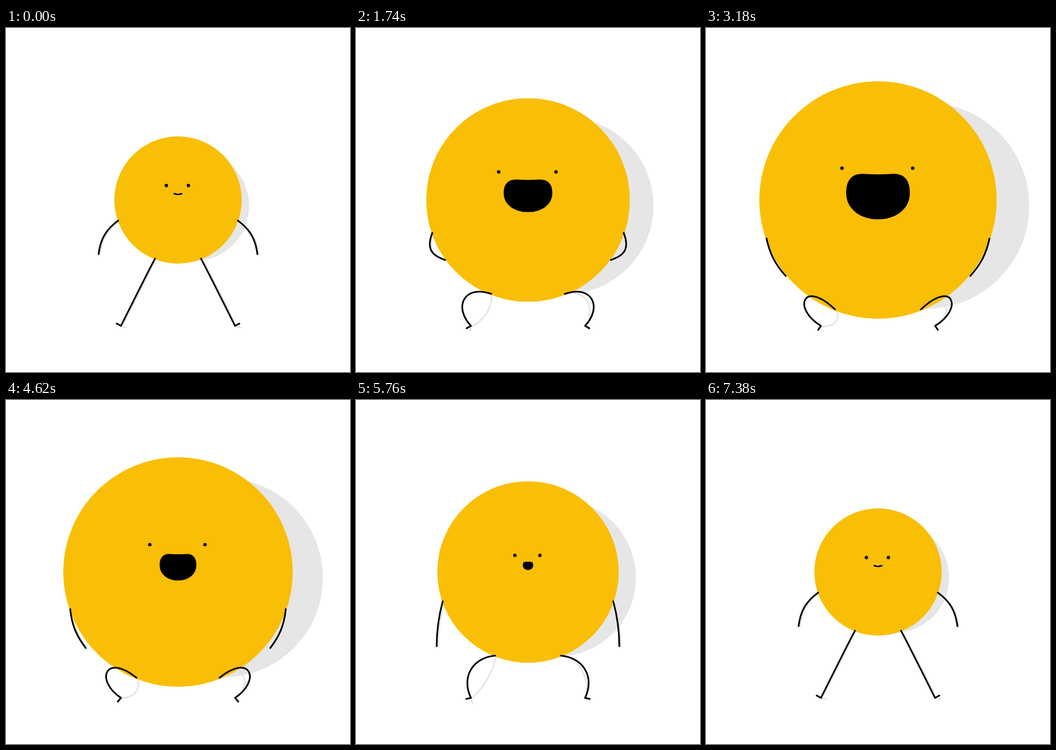
Recreate the animation shown at these times as an HTML page. Size 600x600 px, loop 7.89 s.

```html
<!DOCTYPE html>
<html lang="en">
<head>
<meta charset="utf-8">
<title>Breathe</title>
<style>
  html, body { margin: 0; width: 100%; height: 100%; overflow: hidden; background: #fff; }
  svg { display: block; width: 100vw; height: 100vh; }
  .line { fill: none; stroke: #000; stroke-width: 2.9; stroke-linecap: round; stroke-linejoin: round; }
  .soft { stroke: #e6e6e6; }
  #mouth { stroke: #000; stroke-width: 2.4; stroke-linejoin: round; }
</style>
</head>
<body>
<svg viewBox="0 0 600 600">
  <path id="limbShade" class="line soft"/>
  <circle id="shade" cy="310" fill="#e6e6e6"/>
  <circle id="ball" cx="300" cy="300" fill="#f9be06"/>
  <path id="limbs" class="line"/>
  <circle id="eyeL" r="3"/>
  <circle id="eyeR" r="3"/>
  <path id="mouth"/>
</svg>
<script>
const LOOP = 7890, PEAK = 3690, END = 7380;
const el = id => document.getElementById(id);
const set = (id, attrs) => { for (const k in attrs) el(id).setAttribute(k, attrs[k]); };
const clamp = x => Math.min(1, Math.max(0, x));
const span = (t, a, b) => clamp((t - a) / (b - a));
const smooth = x => x * x * (3 - 2 * x);
const mix = (a, b, k) => a + (b - a) * k;
const pt = p => p[0].toFixed(2) + ' ' + p[1].toFixed(2);
const cubic = (a, b, c, d) => `M${pt(a)}C${pt(b)} ${pt(c)} ${pt(d)}`;
const flip = p => [600 - p[0], p[1]];
const shift = (p, dx, dy) => [p[0] + dx, p[1] + dy];

// Ease with control points (a, 0) and (b, 1)
function ease(x, a, b) {
  let lo = 0, hi = 1;
  for (let i = 0; i < 24; i++) {
    const s = (lo + hi) / 2, r = 1 - s;
    if (3 * a * s * r * r + 3 * b * s * s * r + s * s * s < x) lo = s; else hi = s;
  }
  return smooth(lo);
}

// Point at an angle in degrees, 8.5 away: the tip of a foot
function toe(p, deg) {
  const a = deg * Math.PI / 180;
  return shift(p, 8.5 * Math.cos(a), 8.5 * Math.sin(a));
}

// Elastic arm: the closer the hand, the stronger the bend
function arm(from, to) {
  const dx = to[0] - from[0], dy = to[1] - from[1], len = Math.hypot(dx, dy);
  const bend = Math.max(0, 16 - 0.45 * (len - 50)) / 0.75;
  const nx = -dy / len * bend, ny = dx / len * bend;
  return [from, shift(from, dx * 0.36 + nx, dy * 0.36 + ny),
    shift(to, -dx * 0.36 + nx, -dy * 0.36 + ny), to];
}

function mouthPath(w, h, cy) {
  const k = 1 - clamp((h - 2.5) / 10);
  const W = (w - 2.4) / 2, H = Math.max(0.1, h - 2.4);
  const top = cy - H / 2 - 0.4 * k, side = top + 0.42 * H;
  const dip = top + 0.012 * H + 1.4 * k, low = top + H + 1.4 * k;
  const p = (x, y) => pt([300 + x * W, y]);
  return `M${p(-1, side)}C${p(-1, side - 0.3 * H)} ${p(-0.8, top)} ${p(-0.5, top + 0.7 * k)}` +
    `C${p(-0.25, dip)} ${p(-0.2, dip)} ${p(0, dip)}` +
    `C${p(0.2, dip)} ${p(0.25, dip)} ${p(0.5, top + 0.7 * k)}` +
    `C${p(0.8, top)} ${p(1, side - 0.3 * H)} ${p(1, side)}` +
    `C${p(1, side + 0.36 * H)} ${p(0.55, low)} ${p(0, low)}` +
    `C${p(-0.55, low)} ${p(-1, side + 0.36 * H)} ${p(-1, side)}Z`;
}

function draw(t) {
  const inhale = t < PEAK;
  const f = inhale ? ease(span(t, 0, 3600), 0.36, 0.325)
                   : 1 - ease(span(t, PEAK, END), 0.565, 0.58);
  const r = 111 + 97 * f;

  set('ball', { r });
  set('shade', { r: r * 0.868, cx: 327.7 + 57.2 * Math.pow(f, inhale ? 1.15 : 1.25) });

  // Legs
  const hip = [300 - 0.362 * r, 300 + 0.922 * r], ankle = [200.5, 519.5];
  const leg = [hip, [240 - 84 * f + 12 * f * f, 440 + 40 * f - 43 * f * f],
    [220 - 80 * f + 10 * f * f, 481 + 9 * f], ankle];
  const foot = toe(ankle, 180 + 28 - 84 * f);

  // Arms
  const drop = inhale ? smooth(span(t, 1050, 3100)) : 1 - smooth(span(t, 5450, 7290));
  const hand = [mix(161.5, 139, drop), mix(394.5, 432.5, drop)];
  const left = arm([300 - 0.94 * r, 300 + 0.323 * r], hand).map(p => [p[0], p[1]]);
  // The bend always points away from the body
  const right = left.map(flip);

  set('limbs', { d: cubic(...leg) + 'L' + pt(foot) +
    cubic(...leg.map(flip)) + 'L' + pt(flip(foot)) + cubic(...left) + cubic(...right) });

  // Limb shadows: both legs bow to the right
  const endL = [201.5, 520.5], endR = [400.5, 520.5];
  const legL = [shift(hip, 1, 1), [243 - 7 * f, 441 + 68 * f], [223 + f, 482 + 40 * f], endL];
  const legR = [shift(flip(hip), 1, 1), [363 + 65 * f - 5 * f * f, 441 + 30 * f - 16 * f * f],
    [384 + 49 * f, 480 + 20 * f], endR];
  const armShade = a => cubic(...a.map(p => shift(p, 2.6, 1)));
  set('limbShade', { d: cubic(...legL) + 'L' + pt(toe(endL, 12 + 150 * f - 18 * f * f)) +
    cubic(...legR) + 'L' + pt(toe(endR, 12 + 40 * f)) + armShade(left) + armShade(right) });

  // Face
  const g = inhale ? Math.pow(f, 0.88) : 1 - smooth(span(t, PEAK, 6130));
  const gap = 19.2 + 42.9 * g, cy = 274.7 - 30.3 * Math.pow(g, 0.75);
  set('eyeL', { cx: 298.9 - gap, cy });
  set('eyeR', { cx: 298.9 + gap, cy });

  const m = inhale ? g : Math.pow(g, 1.8);
  const blow = inhale ? 0 : 1 - smooth(span(t, 5760, 7290));
  const w = 16 + 96 * m + 1.6 * (1 - m) * blow;
  const h = 2.5 + 77.5 * Math.pow(m, inhale ? 1.07 : 1) + 11.5 * (1 - m) * blow;
  set('mouth', { d: mouthPath(w, h, 289.3 + 4.7 * m) });
}

const start = performance.now();
function tick() {
  draw((performance.now() - start) % LOOP);
  requestAnimationFrame(tick);
}
tick();
</script>
</body>
</html>
```
